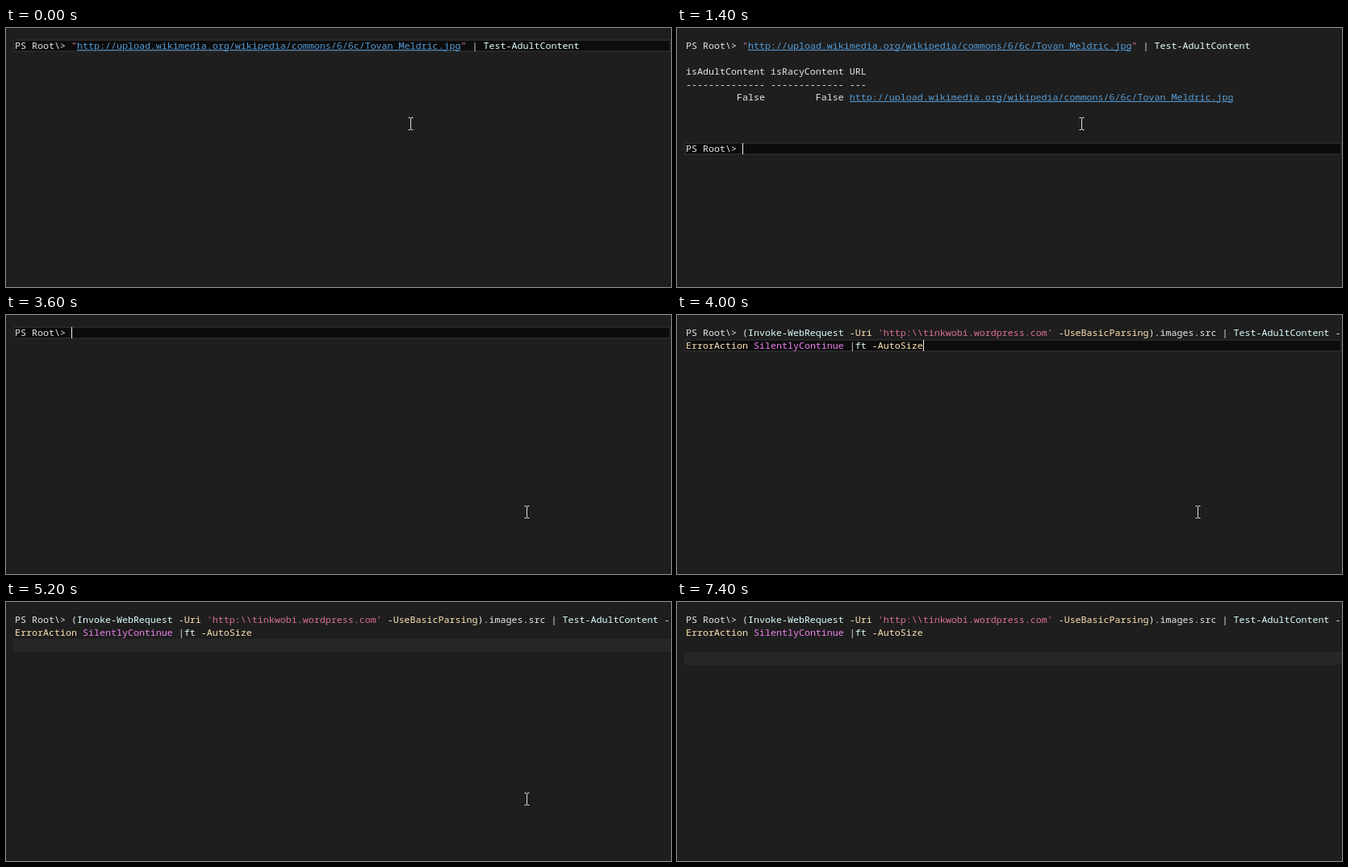
An HTML page that plays this animation: 824x322 px, repeating every 8 s.

```html
<!DOCTYPE html>
<html lang="en">
<head>
<meta charset="utf-8">
<title>Console session</title>
<style>
html, body { margin: 0; width: 100%; height: 100%; overflow: hidden; background: #1e1e1e; }
#stage { position: relative; width: 824px; height: 322px; overflow: hidden; }
#stage > * { position: absolute; }
#screen {
  left: 11px; top: 13.5px; margin: 0; color: #e8e8e8;
  font: 11.6667px/16px "Noto Sans Mono", "DejaVu Sans Mono", monospace;
  font-variant-ligatures: none;
}
#bar { left: 9px; width: 815px; height: 16px; box-sizing: border-box; border: 2px solid #272727; }
#caret { width: 1px; height: 14px; background: #f0f0f0; }
svg { left: 0; top: 0; }
.cmd { color: #e0ffff; }
.arg { color: #ee82ee; }
.par { color: #ffe4b5; }
.str { color: #db7093; }
.url { color: #569cd6; text-decoration: underline 1px; text-underline-offset: 1px; }
</style>
</head>
<body>
<div id="stage">
  <div id="bar"></div>
  <pre id="screen"></pre>
  <div id="caret"></div>
  <svg width="824" height="322" fill="none">
    <path id="beam" d="M-3 -7.5h2.5m1 0h2.5M0 -7v14M-3 7.5h2.5m1 0h2.5" stroke="#dcdcdc"/>
    <g id="ring" stroke-width="5">
      <circle r="7.5" stroke="#2f95ea"/>
      <path d="M-4.8 -5.8A7.5 7.5 0 0 0 -4.8 5.8" stroke="#3fb4f6"/>
    </g>
  </svg>
</div>
<script>
const LOOP = 8000, STEP = 200, COL = 7, ROW = 16;
const [screen, bar, caret, beam, ring] =
  ["screen", "bar", "caret", "beam", "ring"].map(id => document.getElementById(id));

const span = (kind, text) => `<span class="${kind}">${text}</span>`;
const prompt = "PS Root\\&gt; ";
const link = span("url", "http://upload.wikimedia.org/wikipedia/commons/6/6c/Tovan_Meldric.jpg");
const quote = span("str", '"');
const test = span("cmd", "Test-AdultContent");

const first = `${prompt}${quote}${link}${quote} | ${test}`;
const table = [
  "",
  "isAdultContent isRacyContent URL",
  "-------------- ------------- ---",
  `         False         False ${link}`,
  "", "", ""
];
const second = [
  `${prompt}(${span("cmd", "Invoke-WebRequest")} ${span("par", "-Uri")} ` +
    `${span("str", "'http:\\\\tinkwobi.wordpress.com'")} ${span("par", "-UseBasicParsing")}` +
    `).images.src | ${test} ${span("par", "-")}`,
  `${span("par", "ErrorAction")} ${span("arg", "SilentlyContinue")} |` +
    `${span("cmd", "ft")} ${span("par", "-AutoSize")}`
];

// Console state: lines, active row, caret column (-1 hides it), busy flag
function consoleAt(t) {
  if (t < 200) return { lines: [first], row: 0, col: -1 };
  if (t < 1400) return { lines: [first], row: 1, col: -1, busy: true };
  if (t < 3400) {
    const typed = "cls".slice(0, Math.max(0, Math.floor((t - 2600) / STEP)));
    return { lines: [first, ...table, prompt + span("cmd", typed)], row: 8, col: 10 + typed.length };
  }
  if (t < 4000) return { lines: [prompt], row: 0, col: 10 };
  if (t < 5000) return { lines: second, row: 1, col: t < 4600 ? 42 : -1 };
  return { lines: second, row: t < 7400 ? 2 : 3, col: -1, busy: true };
}

const mix = (a, b, p) => a + (b - a) * p;

function place(el, visible, x, y) {
  el.style.display = visible ? "" : "none";
  el.setAttribute("transform", `translate(${x} ${y})`);
}

function drawMouse(t) {
  const p = Math.min(1, Math.max(0, (t - 1400) / 800));
  const shown = t < 400 || (t >= 1400 && t < 5400);
  place(beam, shown, Math.round(mix(501, 645, p)) + 0.5, Math.round(mix(119, 245, p)));

  const q = Math.max(0, (t - 6400) / 600);
  place(ring, t >= 6200 && t < 7200, mix(643, 790, q), mix(246, 314, q));
}

let lastHtml;
function draw() {
  const t = Math.floor(performance.now() % LOOP / STEP) * STEP;
  const { lines, row, col, busy } = consoleAt(t);
  const html = lines.join("\n");
  if (html !== lastHtml) screen.innerHTML = lastHtml = html;
  bar.style.top = 14 + row * ROW + "px";
  bar.style.background = busy ? "#272727" : "#0c0c0c";
  caret.style.display = col < 0 ? "none" : "";
  caret.style.left = 11 + col * COL + "px";
  caret.style.top = 15 + row * ROW + "px";
  drawMouse(t);
  requestAnimationFrame(draw);
}
draw();
</script>
</body>
</html>
```
